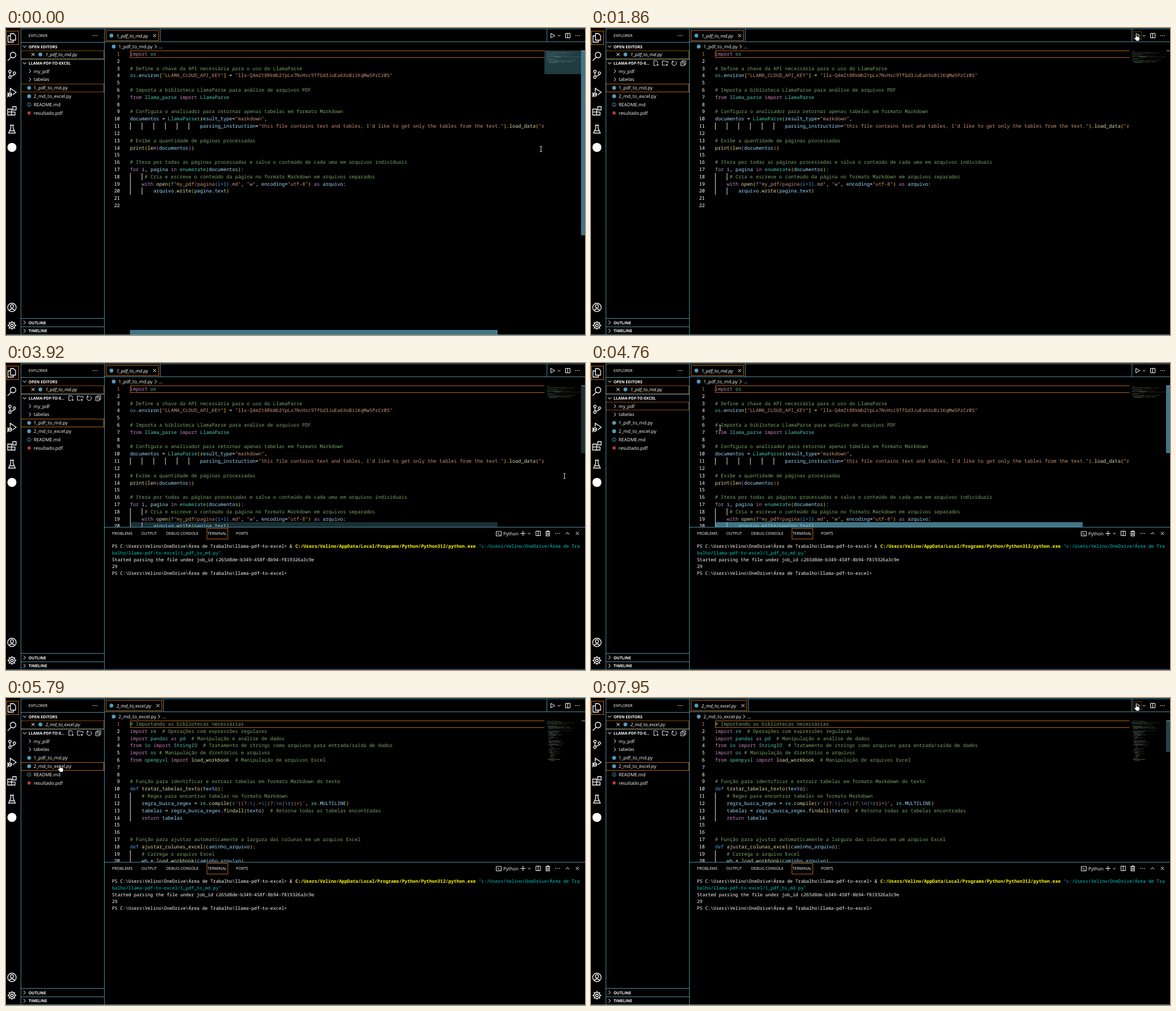
Recreate the animation shown at these times as an HTML page. Size 1027 px wide and 545 px high, loop 8000 ms.

```html
<!DOCTYPE html>
<html lang="en">
<head>
<meta charset="utf-8">
<title>Editor session</title>
<style>
html, body { margin: 0; width: 100%; height: 100%; overflow: hidden; background: #000; }
svg { display: block; width: 1027px; height: 545px; }
text { white-space: pre; text-rendering: geometricPrecision; fill: #fff; }
.ui { font: 8.24px "Open Sans", "Noto Sans", sans-serif; }
.tab { font: italic 8.24px "Open Sans", "Noto Sans", sans-serif; }
.cap { font: 7px "Open Sans", "Noto Sans", sans-serif; }
.head { font: bold 7.05px "Open Sans", "Noto Sans", sans-serif; }
.code { font: 500 8.65px "Noto Sans Mono", "DejaVu Sans Mono", monospace; }
.term { font: 500 8.09px "Noto Sans Mono", "DejaVu Sans Mono", monospace; }
.strong { font-weight: 700; }
.num { text-anchor: end; }
</style>
</head>
<body>
<svg id="stage" viewBox="0 0 1027 545"></svg>
<script>
const TEAL = '#6fc3df', ORANGE = '#f38518', PY = '#519aba';
const CHAR = 5.19, LINE = 12.81, ROW = 14.85;

const files = [
  { name: '1_pdf_to_md.py', tabEnd: 271, crumbEnd: 264, code: String.raw`import os

# Define a chave da API necessária para o uso do LlamaParse
os.environ["LLAMA_CLOUD_API_KEY"] = "llx-Q4mZt8RkWb2YpLx7NvHsc9TfGd3JuEa6XoBi1KqMw5PzCr0S"

# Importa a biblioteca LlamaParse para análise de arquivos PDF
from llama_parse import LlamaParse

# Configura o analisador para retornar apenas tabelas em formato Markdown
documentos = LlamaParse(result_type="markdown",
                        parsing_instruction="this file contains text and tables, I'd like to get only the tables from the text.").load_data("resultado.pdf")

# Exibe a quantidade de páginas processadas
print(len(documentos))

# Itera por todas as páginas processadas e salva o conteúdo de cada uma em arquivos individuais
for i, pagina in enumerate(documentos):
     # Cria e escreve o conteúdo da página no formato Markdown em arquivos separados
    with open(f"my_pdf/pagina{i+1}.md", "w", encoding="utf-8") as arquivo:
        arquivo.write(pagina.text)

` },
  { name: '2_md_to_excel.py', tabEnd: 277, crumbEnd: 270, hidden: 47, code: String.raw`# Importando as bibliotecas necessárias
import re  # Operações com expressões regulares
import pandas as pd  # Manipulação e análise de dados
from io import StringIO  # Tratamento de strings como arquivos para entrada/saída de dados
import os # Manipulação de diretórios e arquivos
from openpyxl import load_workbook  # Manipulação de arquivos Excel


# Função para identificar e extrair tabelas em formato Markdown do texto
def tratar_tabelas_texto(texto):
    # Regex para encontrar tabelas no formato Markdown
    regra_busca_regex = re.compile(r'((?:\|.+\|(?:\n|\r))+)', re.MULTILINE)
    tabelas = regra_busca_regex.findall(texto)  # Retorna todas as tabelas encontradas
    return tabelas


# Função para ajustar automaticamente a largura das colunas em um arquivo Excel
def ajustar_colunas_excel(caminho_arquivo):
    # Carrega o arquivo Excel
    wb = load_workbook(caminho_arquivo)` }
];

// Drawing helpers; thin lines are slightly translucent
const esc = s => s.replace(/&/g, '&amp;').replace(/</g, '&lt;');
const text = (x, y, s, cls = 'ui', fill = '#fff') =>
  `<text x="${x}" y="${y}" class="${cls}" style="fill:${fill}">${esc(s)}</text>`;
const rect = (x, y, w, h, fill, more = '') =>
  `<rect x="${x}" y="${y}" width="${w}" height="${h}" fill="${fill}" ${more}/>`;
const box = (x, y, w, h, more = '') =>
  rect(x + .5, y + .5, w - 1, h - 1, 'none', `stroke="${ORANGE}" stroke-opacity=".75" ${more}`);
const hline = (x, y, w) => rect(x, y, w, 1, TEAL, 'opacity=".7"');
const vline = (x, y, h) => rect(x, y, 1, h, TEAL, 'opacity=".7"');
const dot = (x, y, r, c) => `<circle cx="${x}" cy="${y}" r="${r}" fill="${c}"/>`;
const icon = (x, y, d, w = 1, c = '#fff') =>
  `<path transform="translate(${x} ${y})" d="${d}" fill="none" stroke="${c}" stroke-width="${w}"/>`;
const ring = (x, y, r) => `M${x - r} ${y}a${r} ${r} 0 1 0 ${2 * r} 0a${r} ${r} 0 1 0 ${-2 * r} 0`;
const group = (id, body) => `<g id="${id}">${body}</g>`;
const dots = (x, y) => [-3.3, 0, 3.3].map(d => dot(x + d, y, .8, '#fff')).join('');

const DASH = 'stroke-dasharray="1.4 1.2"';
const RIGHT = 'M-1.8-3.2L1.6 0L-1.8 3.2', DOWN = 'M-3-1.6L0 1.6L3-1.6', SMALL = 'M-2.2-1L0 1.2L2.2-1';
const CROSS = 'M-2.7-2.7L2.7 2.7M2.7-2.7L-2.7 2.7', SPLIT = 'M-4-4H4V4H-4ZM0-4V4';

// Syntax colours
const keywords = new Set('import from for in with as return'.split(' '));
const types = new Set('os llama_parse LlamaParse enumerate re pandas pd io StringIO openpyxl'.split(' '));
const brackets = ['#ffd700', '#da70d6', '#179fff'];

function tokenize(code) {
  let depth = 0;
  return code.split('\n').map(line => {
    const out = [];
    for (const m of line.matchAll(/#.*|[fr]?"[^"]*"|r'[^']*'|\w+|\s+|./g)) {
      const s = m[0], next = line[m.index + s.length];
      if (s[0] === '#') out.push([s, '#7ca668']);
      else if (/["']/.test(s)) {
        const prefix = /^[fr]/.test(s) ? s[0] : '';
        if (prefix) out.push([prefix, '#569cd6']);
        for (const part of s.slice(prefix.length).split(/(\{.*?\}|\\.)/))
          out.push([part, /^[{\\]/.test(part) ? '#569cd6' : '#ce9178']);
      }
      else if (/[(\[]/.test(s)) out.push([s, brackets[depth++ % 3]]);
      else if (/[)\]]/.test(s)) out.push([s, brackets[--depth % 3]]);
      else if (keywords.has(s)) out.push([s, '#c586c0']);
      else if (s === 'def') out.push([s, '#569cd6']);
      else if (types.has(s)) out.push([s, '#4ec9b0']);
      else if (/^\w/.test(s)) out.push([s, next === '(' || s === 'load_workbook' ? '#dcdcaa' : '#9cdcfe']);
      else out.push([s, '#fff']);
    }
    return out;
  });
}

// Stand-in for the lines below the fold, seen only in the minimap
function hiddenLines(count) {
  let seed = 7;
  const rnd = n => (seed = seed * 16807 % 2147483647) % n;
  return Array.from({ length: count }, (_, i) => {
    if (i % 6 === 5) return [];
    const note = rnd(3) === 0, line = [[' '.repeat(4 + 4 * rnd(3)), '']];
    for (let k = 1 + rnd(4); k--;)
      line.push(['x'.repeat(4 + rnd(10)), note ? '#7ca668' : ['#9cdcfe', '#dcdcaa', '#ce9178'][rnd(3)]], [' ', '']);
    return line;
  });
}

function minimap(lines) {
  let out = '';
  lines.forEach((line, i) => {
    let col = 0;
    for (const [s, color] of line) for (const w of s.split(/(\s+)/)) {
      if (w.trim() && col < 112)
        out += rect((959.5 + col * .54).toFixed(2), (40.6 + i * 1.07).toFixed(2),
          (Math.min(w.length, 112 - col) * .54).toFixed(2), .7, color);
      col += w.length;
    }
  });
  return `<g opacity=".4">${out}</g>`;
}

function editor(file, id) {
  const lines = tokenize(file.code);
  let body = '', nums = '';
  lines.forEach((line, i) => {
    const y = 49 + i * LINE, top = 39.8 + i * LINE;
    const spans = line.map(([s, c]) => `<tspan fill="${c}">${esc(s)}</tspan>`).join('');
    body += `<text x="220" y="${y.toFixed(2)}" class="code">${spans}</text>`;
    nums += text(202, y.toFixed(2), String(i + 1), 'code num', i ? '#fff' : ORANGE);
    const indent = line.length && /^\s+$/.test(line[0][0]) ? line[0][0].length : 0;
    for (let c = 0; c < indent; c += 4)
      body += rect(220 + c * CHAR, top, 1, LINE, '#ddd');
  });
  const { name, tabEnd: e, crumbEnd: c } = file;
  return group(id,
    dot(187, 13.5, 3.4, PY) + text(196, 16.6, name, 'tab') + icon(e - 7.5, 13.5, CROSS) +
    box(177, 4, e - 177, 19) + vline(e + 2, 1, 23) +
    dot(191, 33, 3.4, PY) + text(199.5, 36, name) + icon(c + 1.5, 33, RIGHT, .9) + text(c + 7, 36, '...') +
    dot(61, 47, 3.4, PY) + text(70, 50, name, 'tab') +
    nums + `<g clip-path="url(#codeArea)">${body}</g>` +
    minimap(lines.concat(hiddenLines(file.hidden || 0))));
}

function activityBar() {
  const gear = Array.from({ length: 8 }, (_, i) => {
    const a = i * Math.PI / 4, c = Math.cos(a), s = Math.sin(a);
    return `M${5.6 * c} ${5.6 * s}L${7.8 * c} ${7.8 * s}`;
  }).join('');
  return box(0, 5, 23, 25) +
    icon(10.5, 17.5, 'M-2.5-7.5H3L6.5-4V4H-2.5ZM-2.5-3.5H-7V7.5H2.5V4', 1.3) +
    icon(10.5, 50, ring(2, -2, 5) + 'M-1.5 2L-7.5 8', 1.3) +
    icon(10.5, 82, ring(-3.5, -5, 2.2) + ring(-3.5, 5.3, 2.2) + ring(4.5, -2, 2.2) + 'M-3.5-2.8V3M4.5 .2Q4.5 2.6-2.4 3.4', 1.3) +
    icon(10.5, 115, 'M-3-2V-8L7.5-1L1.5 3.5' + ring(-3.5, 3, 3) + 'M-8.5 0L-6 2M-8.5 4H-6.5M-8.5 7.5L-6 5.5M-6.5 3H-.5', 1.3) +
    icon(10.5, 147, 'M-7.5-3H-.5V7.5H-7.5ZM-7.5 2.2H5.5V7.5H-.5M1.5-7.5H7.5V-1.5H1.5Z', 1.3) +
    icon(10.5, 179.5, 'M-3.5-7H3.5M-2-7V-2L-6 7H6L2-2V-7M-4 3H4', 1.3) +
    dot(10.5, 212, 8, '#fff') +
    icon(10.5, 496, ring(0, 0, 7.5) + ring(0, -2, 2.8) + 'M-5 5.5Q0-.5 5 5.5', 1.3) +
    icon(10.5, 528, ring(0, 0, 2.3) + ring(0, 0, 5.4) + gear, 1.5);
}

function explorer() {
  const rows = ['my_pdf', 'tabelas', '1_pdf_to_md.py', '2_md_to_excel.py', 'README.md', 'resultado.pdf'];
  const head = (y, s, d) => icon(33, y - 2.7, d) + text(40, y, s, 'head');
  const list = rows.map((s, i) => {
    const y = 76.6 + i * ROW;
    const mark = i < 2 ? icon(42.5, y, RIGHT)
      : i < 4 ? dot(41, y, 3.4, PY)
      : i === 4 ? icon(41, y, ring(0, 0, 3.3) + 'M0-.6V2M0-2V-1.2', .9, PY)
      : rect(38.5, y - 2.5, 5, 5, '#cc3e44');
    return mark + text(49, y + 3, s);
  }).join('');
  return text(40, 16, 'EXPLORER', 'cap') + dots(158, 13.5) + hline(26, 25, 148) +
    head(35.6, 'OPEN EDITORS', DOWN) + icon(48, 47, CROSS) +
    box(26, 40, 148, 15, 'opacity=".7"') + hline(26, 55, 148) +
    icon(33, 62.5, DOWN) +
    group('headIdle', text(40, 65.2, 'LLAMA-PDF-TO-EXCEL', 'head')) +
    group('headActive', text(40, 65.2, 'LLAMA-PDF-TO-E...', 'head') +
      icon(115, 62.5, 'M0 4H-3.5V-4.5H1L3-2.5V0M3 1V5M1 3H5', .9) +
      icon(131.5, 62.5, 'M0 3.5H-5V-4H-1L0-2.8H5V0M3 1V5M1 3H5', .9) +
      icon(147.5, 62.5, 'M-2.5-3.2A4 4 0 1 0 2-3.5M-4.2-3.8H-1.9V-1.2') +
      icon(163.5, 62.5, 'M-2-2V-4.5H4.5V2H2M-4.5-2H2V4.5H-4.5ZM-3 1.2H.6', .9)) +
    list +
    group('selected', box(26, 0, 148, 15)) +
    group('hovered', rect(26, 0, 148, 15, '#fff', 'opacity=".1"') + box(26, 0, 148, 15, DASH)) +
    hline(26, 515, 148) + head(525.5, 'OUTLINE', RIGHT) +
    hline(26, 530, 148) + head(540.2, 'TIMELINE', RIGHT);
}

function terminal() {
  const prompt = String.raw`PS C:\Users\Velino\OneDrive\Área de Trabalho\llama-pdf-to-excel>`;
  const row = (n, s, c, col = 0, cls = 'term') =>
    text(188 + col * 8.09 * .6, 328.4 + n * 11.9, s, cls, c);
  const tabs = [[188, 'PROBLEMS'], [240, 'OUTPUT'], [284, 'DEBUG CONSOLE'], [357.5, 'TERMINAL'], [408, 'PORTS']];
  return group('panel', rect(174, 291, 853, 253, '#000') + hline(174, 291, 853) + vline(174, 291, 254) +
    tabs.map(([x, s]) => text(x, 305, s, 'cap')).join('') + box(356, 293, 38, 20) +
    icon(874, 303, 'M-4.5-4H4.5V4H-4.5ZM-2.5-2L0 0L-2.5 2M.5 2.2H3', .9) + text(882, 306, 'Python') +
    icon(917, 302.5, 'M-4.5 0H4.5M0-4.5V4.5') + icon(928, 302.5, SMALL) + icon(944, 302.5, SPLIT) +
    icon(961, 302.5, 'M-4-3H4M-1.5-3V-4.5H1.5V-3M-3-3V4.5H3V-3M-1-1V3M1-1V3', 1.1) + dots(978.5, 302.5) +
    icon(996, 302.5, 'M-3.2 1.6L0-1.6L3.2 1.6') + icon(1013.5, 302.5, CROSS) +
    group('command', row(0, prompt + ' &') +
      row(0, 'C:/Users/Velino/AppData/Local/Programs/Python/Python312/python.exe', '#ff0', 67, 'term strong') +
      row(0, '"c:/Users/Velino/OneDrive/Área de Tra', '#00cdcd', 134) +
      row(1, 'balho/llama-pdf-to-excel/1_pdf_to_md.py"', '#00cdcd')) +
    group('started', row(2, 'Started parsing the file under job_id c265d8de-b349-458f-8b94-f819326a3c9e')) +
    group('count', row(3, '29')) +
    group('prompt', row(4, prompt)));
}

const pointers = {
  ibeam: icon(0, 0, 'M-2-4.5H-.5L0-4L.5-4.5H2M0-4V4M-2 4.5H-.5L0 4L.5 4.5H2', .9),
  hand: '<path d="M-1 1Q0-.7 1 1V5Q4.5 5 6 6.6Q6.8 9.5 5.2 13H0Q-1.6 10-3.6 7.8Q-3 6-1 7.4Z" fill="#fff" stroke="#000" stroke-width=".7"/>',
  arrow: '<path d="M0 0V11L2.6 8.6L4.4 12.4L6 11.6L4.3 8H7.8Z" fill="#fff" stroke="#000" stroke-width=".7"/>'
};

document.getElementById('stage').innerHTML =
  '<clipPath id="codeArea"><rect x="219" y="39" width="736" height="506"/></clipPath>' +
  activityBar() + explorer() +
  hline(26, 1, 1001) + hline(174, 24, 853) + vline(26, 1, 544) + vline(174, 1, 544) +
  vline(959, 1, 23) + hline(0, 544, 1027) +
  icon(969.5, 13.5, 'M-3-4L4 0L-3 4Z') + icon(981, 13.5, SMALL) + icon(996.5, 13.5, SPLIT) + dots(1014, 13.5) +
  `<path d="M955 40.5H220.5V52.5H955" fill="none" stroke="${ORANGE}" stroke-opacity=".75"/>` +
  files.map((f, i) => editor(f, 'file' + i)).join('') +
  rect(1021, 40, 6, 1, '#aaa') +
  rect(955, 40, 65, 42, TEAL, 'id="slider"') +
  rect(220, 0, 652, 8.5, TEAL, 'id="hbar"') + rect(1020, 40, 7, 0, TEAL, 'id="vbar"') +
  terminal() +
  group('runHover', box(962, 6, 15, 15, DASH)) +
  Object.entries(pointers).map(([id, body]) => group(id, body)).join('');

// Timed tracks: [ms, value, ...]
const mouse = [[0, 949, 215], [60, 949, 215], [300, 942, 170], [600, 943, 100], [840, 955, 30], [1200, 990, 22],
  [1560, 968, 12], [1860, 967, 10], [2420, 967, 10], [2560, 1000, 40], [2700, 1040, 90], [3860, 1040, 190],
  [4200, 760, 250], [4500, 420, 170], [4700, 229, 116], [4760, 229, 115], [5000, 160, 112], [5400, 98, 120],
  [5610, 95.5, 118.5], [6100, 95.5, 118.5], [6570, 118.5, 115.5], [6690, 176, 108], [6870, 440, 150],
  [7250, 700, 120], [7600, 935, 38], [7760, 967, 13], [7950, 967, 10], [8000, 967, 10]];
const bars = [[0, .6], [780, .6], [1580, 0], [2110, 0], [2160, .6], [2440, .6], [3240, 0], [3880, 0], [3980, .6],
  [4760, .6], [5500, 0], [6690, 0], [6790, .6], [7600, .6], [8400, 0]];
const sliderFade = [[0, .3], [60, .3], [180, 0], [8000, 0]];

function at(track, t) {
  const i = track.findIndex(k => k[0] > t), a = track[i - 1], b = track[i];
  const p = (t - a[0]) / (b[0] - a[0]);
  return a.slice(1).map((v, k) => v + (b[k + 1] - v) * p);
}

const set = (id, name, value) => document.getElementById(id).setAttribute(name, value);
const show = (id, on) => set(id, 'display', on ? 'inline' : 'none');
const rowShift = i => `translate(0 ${Math.round(69 + i * ROW)})`;

function draw(t) {
  const second = t >= 5730, panel = t >= 2110;
  show('file0', !second);
  show('file1', second);

  show('panel', panel);
  show('command', t >= 2420);
  show('started', t >= 2900);
  show('count', t >= 3200);
  show('prompt', t >= 3500);

  const active = t >= 1260 && t < 4300 || t >= 5000;
  show('headActive', active);
  show('headIdle', !active);

  const [x, y] = at(mouse, t), inTree = x < 174;
  const row = t < 4300 ? 2 : t < 5670 ? 0 : 3;
  const over = Math.floor((y - 71.5) / ROW);
  set('selected', 'transform', rowShift(row));
  set('selected', 'opacity', active ? 1 : .75);
  show('hovered', inTree && over !== row);
  set('hovered', 'transform', rowShift(over));

  const onRun = x > 961 && x < 978 && y < 21;
  const pointer = onRun || inTree ? 'hand' : y >= 40 ? 'ibeam' : 'arrow';
  show('runHover', onRun);
  for (const id in pointers) show(id, id === pointer);
  set(pointer, 'transform', `translate(${x} ${y})`);

  const [fade] = at(bars, t);
  set('slider', 'opacity', at(sliderFade, t)[0]);
  set('vbar', 'opacity', fade);
  set('vbar', 'height', second ? 56 : panel ? 120 : 328);
  set('hbar', 'opacity', second ? 0 : fade);
  set('hbar', 'y', panel ? 282.5 : 536);
}

let start;
function frame(now) {
  start ??= now;
  draw((now - start) % 8000);
  requestAnimationFrame(frame);
}
draw(0);
requestAnimationFrame(frame);
</script>
</body>
</html>
```
